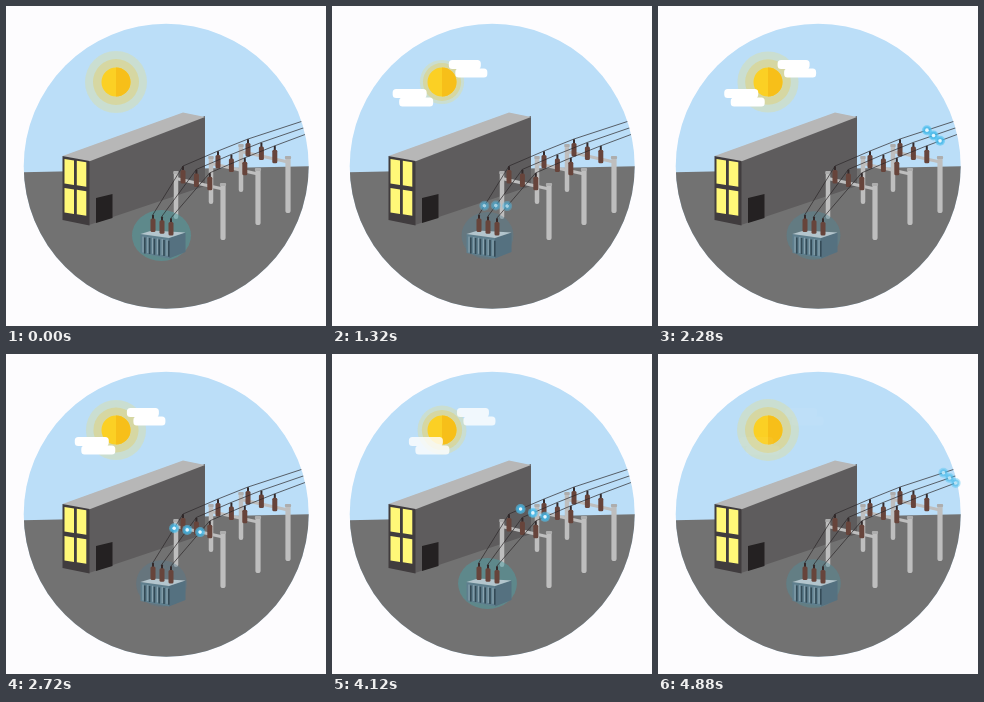
An HTML page with a canvas for the animation above (4.92 s loop, 320 by 320 pixels).

```html
<!DOCTYPE html>
<html lang="en">
<head>
<meta charset="utf-8">
<title>Power substation</title>
<style>
html, body { margin: 0; width: 100%; height: 100%; overflow: hidden; background: #fdfcfe; }
canvas { display: block; width: 320px; height: 320px; }
</style>
</head>
<body>
<canvas id="stage"></canvas>
<script>
const LOOP = 4920, SPARK_TIME = LOOP / 4, SUN_TIME = LOOP / 2, GLOW_TIME = 1020;
const canvas = document.getElementById('stage');
const ctx = canvas.getContext('2d');
const scale = window.devicePixelRatio || 1;
canvas.width = canvas.height = 320 * scale;

const phases = [0, 1, 2];
const gantries = [[170, 167], [205, 152], [235, 140]];
const gantryTip = ([x, y], n) => [x + 7 + 13.4 * n, y - 7 + 3.4 * n];
const transformerTip = n => [147 + 9 * n, 208.5 + 1.7 * n];
const wires = phases.map(n => [
  transformerTip(n),
  ...gantries.map(g => gantryTip(g, n)),
  [303, 113 + 7 * n]
]);

const clamp = v => Math.max(0, Math.min(1, v));
const mix = (a, b, k) => a + (b - a) * k;
const pulse = (t, period) => (1 + Math.cos(2 * Math.PI * t / period)) / 2;

function heightAt(wire, x) {
  let i = 1;
  while (i < wire.length - 1 && wire[i][0] < x) i++;
  const [ax, ay] = wire[i - 1], [bx, by] = wire[i];
  return mix(ay, by, (x - ax) / (bx - ax));
}

function poly(color, ...points) {
  ctx.fillStyle = color;
  ctx.beginPath();
  points.forEach(p => ctx.lineTo(p[0], p[1]));
  ctx.fill();
}

function disc(x, y, rx, color, ry = rx) {
  ctx.fillStyle = color;
  ctx.beginPath();
  ctx.ellipse(x, y, rx, ry, 0, 0, 2 * Math.PI);
  ctx.fill();
}

function bar(x, y, w, h, r, color) {
  ctx.fillStyle = color;
  ctx.beginPath();
  ctx.roundRect(x, y, w, h, r);
  ctx.fill();
}

function line(color, width, ...points) {
  ctx.strokeStyle = color;
  ctx.lineWidth = width;
  ctx.beginPath();
  points.forEach(p => ctx.lineTo(p[0], p[1]));
  ctx.stroke();
}

function drawSun(t) {
  const k = pulse(t, SUN_TIME);
  disc(110, 76, mix(22, 31, k), 'rgba(228,222,140,.36)');
  disc(110, 76, mix(19, 23, k), 'rgba(228,206,96,.42)');
  disc(110, 76, 14.5, '#fbd024');
  ctx.fillStyle = '#f7bf19';
  ctx.beginPath();
  ctx.arc(110, 76, 14.5, -Math.PI / 2, Math.PI / 2);
  ctx.fill();
}

function drawCloud(x, y, width) {
  ctx.fillStyle = '#fff';
  ctx.beginPath();
  ctx.roundRect(x, y, width, 9, 3.5);
  ctx.roundRect(x + 6.5, y + 8.5, width, 9, 3.5);
  ctx.fill();
}

function drawClouds(t) {
  ctx.globalAlpha = clamp(Math.min(t, LOOP - t) / 1000);
  drawCloud(53 + t * .0058, 83, 34);
  drawCloud(113 + t * .0029, 54, 32);
  ctx.globalAlpha = 1;
}

function drawBuilding() {
  poly('#5e5c5d', [83, 154], [199, 110], [199, 180], [83, 219]);
  poly('#b7b7b7', [56.5, 150], [177, 106.5], [199, 111], [83, 155.5]);
  poly('#403c3e', [56.5, 150], [83.5, 155], [83.5, 219.5], [56.5, 214]);
  for (const column of [0, 1]) for (const row of [0, 1]) {
    const x = 58.5 + column * 12.3, y = 153 + column * 1.7 + row * 29;
    poly('#fff878', [x, y], [x + 9.5, y + 1.5], [x + 9.5, y + 26], [x, y + 24.5]);
  }
  poly('#242122', [90, 192], [106.5, 188], [106.5, 212], [90, 217]);
}

function insulator([x, y]) {
  bar(x - 1, y, 2, 6, 1, '#33292a');
  bar(x - 2.5, y + 4, 5, 13.5, 1.5, '#67443b');
}

function pole(x, top, bottom, width) {
  bar(x - width / 2, top, width, bottom - top, width / 2, '#bebebe');
  bar(x - width / 2 - .5, top, width + 1, 3, 1, '#adadad');
}

function drawGantry(base) {
  const [x, y] = base;
  pole(x, y - 2, y + 46, 4.5);
  line('#bebebe', 3.2, [x, y + 5.5], [x + 47, y + 16]);
  pole(x + 47, y + 10, y + 67, 5.2);
  phases.forEach(n => insulator(gantryTip(base, n)));
}

function drawGlow(t) {
  const k = pulse(t, GLOW_TIME);
  const color = `rgba(${mix(86, 75, k)},${mix(108, 160, k)},${mix(136, 164, k)},${mix(.35, .5, k)})`;
  disc(155.5, 229.5, mix(24, 29.5, k), color, mix(22.5, 25.5, k));
}

function drawTransformer() {
  poly('#5f7f8e', [134.5, 228], [163, 232], [163, 252.5], [134.5, 247]);
  poly('#557180', [163, 232], [179.5, 226.5], [179.5, 246], [163, 252.5]);
  poly('#b3c5cd', [134.5, 228], [146, 224.5], [179.5, 226.5], [163, 232]);
  for (let x = 137; x < 162; x += 4.8) {
    const y = 230 + (x - 134) * .14;
    line('#88a2ae', 1.2, [x, y], [x, y + 16]);
    line('#344b57', 1.6, [x + 1.8, y + 1], [x + 1.8, y + 17]);
  }
  phases.forEach(n => insulator(transformerTip(n)));
}

function drawSparks(t) {
  const p = t % SPARK_TIME, u = p / SPARK_TIME;
  ctx.globalAlpha = clamp(p / 150) * clamp((1330 - p) / 200);
  wires.forEach((wire, n) => {
    // The steeper wires start more slowly.
    const progress = u - .31 * (2 - n) * u * (1 - u) ** 3;
    const x = mix(wire[0][0], 290 + 6 * n, progress), y = heightAt(wire, x);
    disc(x, y, 5, 'rgba(80,195,240,.6)');
    disc(x, y, 3.6, 'rgba(60,180,232,.6)');
    disc(x, y, 1.8, '#e2f6ff');
  });
  ctx.globalAlpha = 1;
}

function draw(t) {
  ctx.setTransform(scale, 0, 0, scale, 0, 0);
  ctx.fillStyle = '#fdfcfe';
  ctx.fillRect(0, 0, 320, 320);
  ctx.save();
  ctx.beginPath();
  ctx.arc(160.2, 160.3, 142.5, 0, 2 * Math.PI);
  ctx.clip();
  ctx.fillStyle = '#bbdef8';
  ctx.fillRect(0, 0, 320, 320);
  poly('#727272', [0, 166.5], [320, 160], [320, 320], [0, 320]);
  drawSun(t);
  drawClouds(t);
  drawBuilding();
  [...gantries].reverse().forEach(drawGantry);
  drawGlow(t);
  drawTransformer();
  wires.forEach(wire => line('#2b2829', .7, ...wire));
  ctx.restore();
  drawSparks(t);
}

const start = performance.now();
function tick() {
  draw((performance.now() - start) % LOOP);
  requestAnimationFrame(tick);
}
tick();
</script>
</body>
</html>
```
